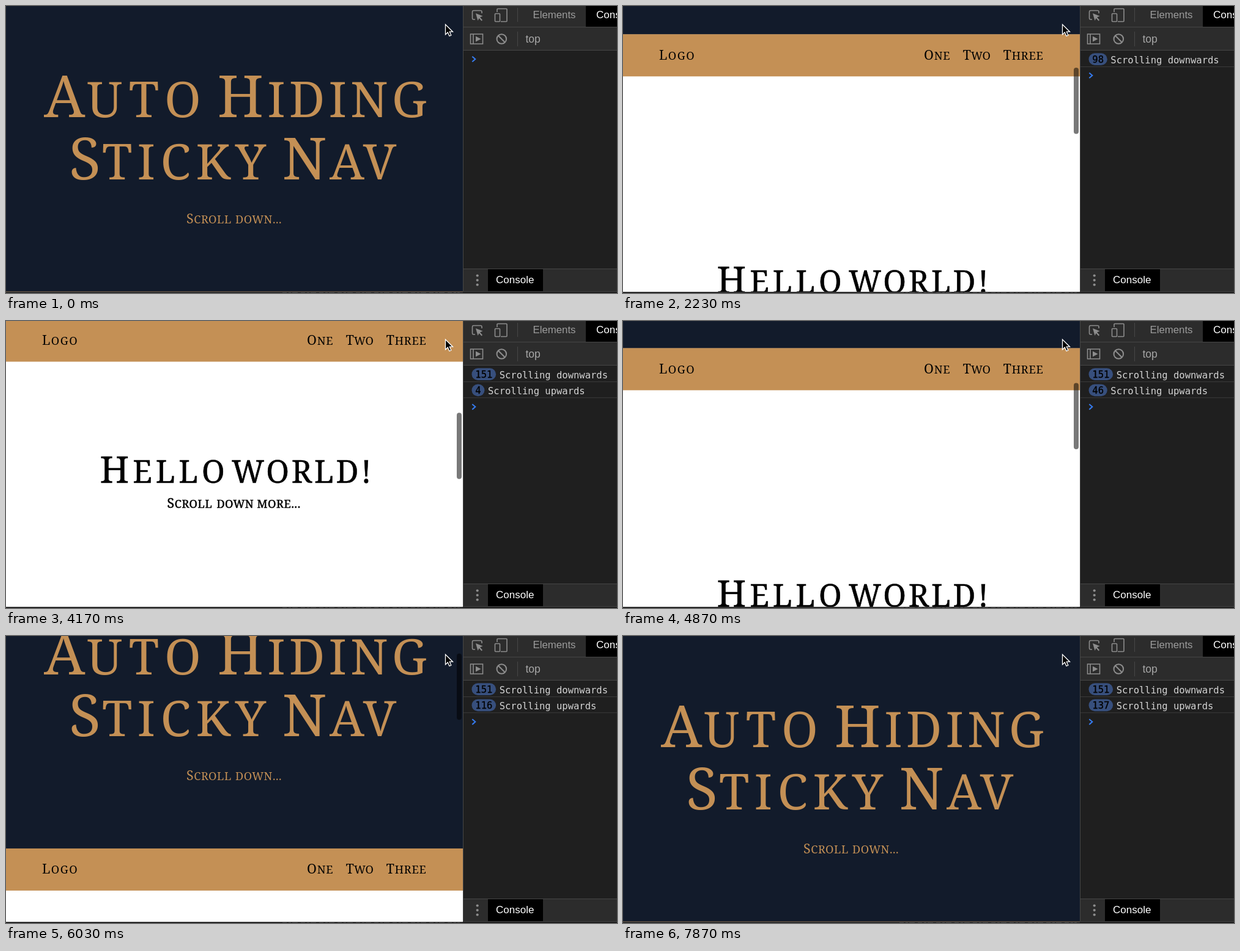
An HTML page for the animation above (7.91 s loop, 999x470 px).

```html
<!DOCTYPE html>
<html lang="en">
<head>
<meta charset="utf-8">
<title>Auto Hiding Sticky Nav</title>
<style>
  html, body { margin: 0; width: 100%; height: 100%; overflow: hidden; background: #121b2b; }
  svg { display: block; width: 100vw; height: 100vh; }
  .serif { font-family: "Noto Serif", serif; }
  .sans { font-family: "Liberation Sans", sans-serif; }
  .mono { font-family: "DejaVu Sans Mono", monospace; font-size: 15.5px; }
  .line { stroke: #464646; fill: none; }
  .icon { stroke: #8d8d8d; stroke-width: 1.6; fill: none; }
</style>
</head>
<body>
<svg viewBox="0 0 999 470" xmlns="http://www.w3.org/2000/svg">
  <defs><clipPath id="view"><rect width="747" height="468"/></clipPath></defs>

  <g clip-path="url(#view)" class="serif">
    <rect width="747" height="468" fill="#fff"/>
    <g id="page">
      <rect y="-20" width="747" height="488" fill="#121b2b"/>
      <g id="hero" fill="#c49055"></g>
      <g id="hello" fill="#000"></g>
    </g>
    <g id="nav" fill="#000">
      <rect width="747" height="69" fill="#c49055"/>
    </g>
    <rect id="thumb" x="737" width="8" height="108.5" rx="4" fill="#000" fill-opacity=".53"/>
  </g>

  <rect y="468" width="999" height="2" fill="#1c1c1c"/>
  <path d="M0 468.5H747" stroke="#444"/>
  <path d="M452 469.5H742" stroke="#3a3a3a" stroke-dasharray="7 3 4 2 9 5"/>

  <g class="sans" font-size="17">
    <rect x="747" width="252" height="468" fill="#1f1f1f"/>
    <rect x="748" width="251" height="72" fill="#2c2c2c"/>
    <rect x="748" y="430" width="251" height="38" fill="#2c2c2c"/>
    <rect x="948" width="51" height="34" fill="#000"/>
    <rect x="788" y="431" width="90" height="36" fill="#000"/>
    <path class="line" d="M747.5 0V468M748 34.5H999M748 72.5H999M748 430.5H999M748 467.5H999M836.5 3V26M836.5 42V66"/>
    <text x="861.5" y="20" font-size="16.8" fill="#9c9c9c">Elements</text>
    <text x="965" y="20" fill="#fff">Console</text>
    <text x="849.5" y="60" font-size="17.5" fill="#a6a6a6">top</text>
    <text x="801" y="454" fill="#fff">Console</text>
    <g class="icon">
      <path d="M767 22H764.5Q762.5 22 762.5 20V9.500Q762.5 7.500 764.5 7.500H776Q778 7.500 778 9.500V12"/>
      <path d="M768 12L779.500 16.500 775 18.500 779 23 777.500 24.500 773.500 20 771.500 24Z" fill="#8d8d8d" stroke="none"/>
      <path d="M803 10V5.500Q803 4.500 804 4.500H818Q819 4.500 819 5.500V24.500Q819 25.500 818 25.500H809"/>
      <rect x="799.5" y="12.500" width="8" height="13" rx="1"/>
      <path d="M759.500 46H779.500V62H759.500ZM764 46V62"/>
      <path d="M768 49.500L776.500 54 768 58.500Z" fill="#8d8d8d" stroke="none"/>
      <circle cx="810.3" cy="54" r="7.800" stroke-width="2"/>
      <path d="M804.800 48.500L815.800 59.500" stroke-width="2"/>
    </g>
    <g fill="#8d8d8d">
      <circle cx="770.7" cy="441.500" r="2.100"/><circle cx="770.7" cy="449" r="2.100"/><circle cx="770.7" cy="456.500" r="2.100"/>
    </g>
  </g>

  <g id="log" class="mono"></g>
  <path id="prompt" d="M762.300 -4.300L767.300 0 762.300 4.300" fill="none" stroke="#367cf1" stroke-width="2"/>
  <path d="M718.500 30.200V46.700L722.300 43.200 725 49.200 727.800 48 725.300 42.200H730.500Z" fill="#000" stroke="#fff" stroke-width="1.300"/>
</svg>

<script>
const LOOP = 7910, NAV_TOP = 467.6, NAV_STUCK = -2.4, ROW = 26.2;
const $ = id => document.getElementById(id);

function add(parent, tag, attrs, text) {
  const el = document.createElementNS('http://www.w3.org/2000/svg', tag);
  for (const k in attrs) el.setAttribute(k, attrs[k]);
  if (text) el.textContent = text;
  parent.appendChild(el);
  return el;
}

// One word in small caps; lead is the spacing after the big capital.
function word(parent, x, y, str, size, gap, lead = gap) {
  const el = add(parent, 'text', { x, y });
  for (const part of str.match(/^[A-Z]|.+/g)) {
    const big = part.length === 1;
    add(el, 'tspan', {
      'font-size': big ? size : size * 0.845,
      'letter-spacing': big ? lead : gap
    }, part.toUpperCase());
  }
}

const hero = $('hero'), hello = $('hello'), nav = $('nav');
word(hero, 62, 182.3, 'Auto', 95.5, 10.5, 3);
word(hero, 345.5, 182.3, 'Hiding', 95.5, 6);
word(hero, 103, 283.7, 'Sticky', 95.5, 8.2, 2);
word(hero, 451.5, 283.7, 'Nav', 95.5, 4.5);
word(hero, 295, 356, 'Scroll', 21.4, 0.6);
word(hero, 375, 356, 'down...', 21.4, 0.5);

hello.setAttribute('stroke', '#000');
hello.setAttribute('stroke-width', 0.5);
word(hello, 153.5, 891, 'Hello', 60.2, 5.9);
word(hello, 369, 891, 'world!', 60.2, 3.9);
word(hello, 263.5, 932.3, 'Scroll', 21.4, 0.6);
word(hello, 344.5, 932.3, 'down', 21.4, 0.4);
word(hello, 410.5, 932.3, 'more...', 21.4, 0.6);

word(nav, 59, 41.4, 'Logo', 21.4, 1.5);
word(nav, 492, 41.4, 'One', 21.4, 0.8);
word(nav, 555.7, 41.4, 'Two', 21.4, 0.1);
word(nav, 621.8, 41.4, 'Three', 21.4, 0.8);

// Console row with a repeat counter
function logRow(label, index) {
  const g = add($('log'), 'g', { transform: `translate(0 ${index * ROW})` });
  const badge = add(g, 'rect', { x: 761.5, y: 77.3, height: 19.7, rx: 9.85, fill: '#374f7d' });
  const num = add(g, 'text', { x: 767.3, y: 93, fill: '#000', stroke: '#000', 'stroke-width': 0.3 });
  const text = add(g, 'text', { y: 94, fill: '#d4d4d4' }, label);
  add(g, 'path', { d: 'M748 99.5H999', stroke: '#3a3a3a' });
  return n => {
    g.style.display = n ? '' : 'none';
    const w = 11.6 + 9.33 * String(n).length;
    badge.setAttribute('width', w);
    num.textContent = n;
    text.setAttribute('x', 761.5 + w + 5.6);
  };
}
const setDown = logRow('Scrolling downwards', 0);
const setUp = logRow('Scrolling upwards', 1);

// [time, value] keys
const scrollKeys = [[600, 0], [860, 25], [1330, 137], [2230, 421], [2400, 477], [2800, 583], [3200, 634],
  [3420, 640], [3790, 640], [4170, 626], [4570, 487], [5430, 315], [6030, 120], [6170, 76], [6410, 0]];
const downKeys = [[597, 0], [1330, 43.3], [2230, 98.3], [3000, 143], [3400, 151]];
const upKeys = [[3780, 0], [3800, 1], [4165, 4], [4200, 5.6], [5430, 80.3], [6030, 116.3], [6395, 137]];

function locate(keys, t) {
  let i = 0;
  while (i < keys.length - 2 && t >= keys[i + 1][0]) i++;
  const [t0, v0] = keys[i], [t1, v1] = keys[i + 1];
  return { i, v0, v1, h: t1 - t0, u: Math.min(1, Math.max(0, (t - t0) / (t1 - t0))) };
}

function linear(keys, t) {
  const { v0, v1, u } = locate(keys, t);
  return v0 + (v1 - v0) * u;
}

// Monotone cubic: smooth speed, no overshoot
function smooth(keys, t) {
  const rate = i => (keys[i + 1][1] - keys[i][1]) / (keys[i + 1][0] - keys[i][0]);
  const slope = i => {
    if (i === 0) return 0;
    if (i === keys.length - 1) return rate(i - 1);
    const a = rate(i - 1), b = rate(i);
    return a * b <= 0 ? 0 : 2 * a * b / (a + b);
  };
  const { i, v0, v1, h, u } = locate(keys, t);
  const w = 1 - u;
  return v0 * (1 + 2 * u) * w * w + v1 * u * u * (3 - 2 * u)
    + h * u * w * (slope(i) * w - slope(i + 1) * u);
}

function draw(t) {
  const y = smooth(scrollKeys, t);
  const down = Math.floor(linear(downKeys, t));
  const up = Math.floor(linear(upKeys, t));

  $('page').setAttribute('transform', `translate(0 ${-y})`);
  nav.setAttribute('transform', `translate(0 ${Math.max(NAV_STUCK, NAV_TOP - y)})`);
  $('thumb').setAttribute('y', y * 0.24);
  $('thumb').setAttribute('opacity', t < 600 ? 0 : Math.min(1, Math.max(0, (7150 - t) / 250)));

  setDown(down);
  setUp(up);
  const rows = (down > 0) + (up > 0);
  $('prompt').setAttribute('transform', `translate(0 ${87 + rows * 26.8})`);
}

const start = performance.now();
function tick() {
  draw((performance.now() - start) % LOOP);
  requestAnimationFrame(tick);
}
tick();
</script>
</body>
</html>
```
